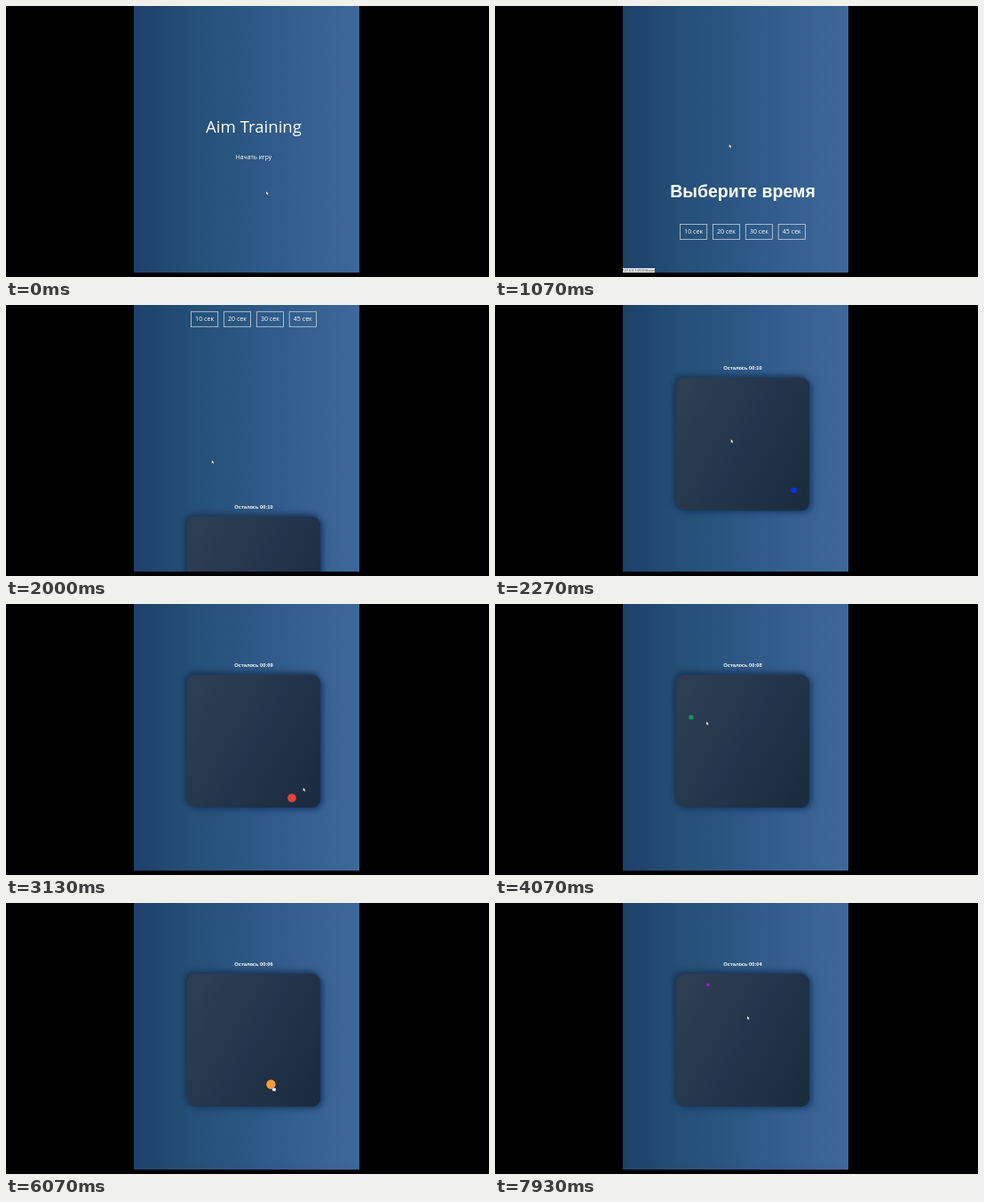
An HTML page for the animation above (8000 ms loop, 544 by 306 pixels).

```html
<!DOCTYPE html>
<html lang="ru">
<head>
<meta charset="utf-8">
<title>Aim Training</title>
<style>
  html, body { margin: 0; width: 100%; height: 100%; overflow: hidden; background: #000; }
  svg { display: block; width: 544px; height: 306px; }
  text { fill: #fff; text-anchor: middle; font-family: "Open Sans", "Noto Sans", sans-serif; }
  .bold { font-family: "Liberation Sans", Arial, sans-serif; font-weight: bold; }
  .glow { filter: blur(3px); }
</style>
</head>
<body>
<svg viewBox="0 0 544 306">
  <defs>
    <linearGradient id="sky">
      <stop offset="0" stop-color="#1d406b"/>
      <stop offset=".25" stop-color="#244f76"/>
      <stop offset=".6" stop-color="#2f5a89"/>
      <stop offset="1" stop-color="#3e6899"/>
    </linearGradient>
    <linearGradient id="slate" x1="0" y1=".22" x2="1" y2=".78">
      <stop offset="0" stop-color="#2e3e53"/>
      <stop offset=".5" stop-color="#23354c"/>
      <stop offset="1" stop-color="#1c2c40"/>
    </linearGradient>
    <clipPath id="view"><rect x="144" width="254" height="301"/></clipPath>
  </defs>

  <g clip-path="url(#view)">
    <rect x="144" width="254" height="301" fill="url(#sky)"/>
    <g id="pages">
      <text x="279" y="143" font-size="18.6">Aim Training</text>
      <text x="279" y="172.5" font-size="6.8">Начать игру</text>

      <g transform="translate(0 301)">
        <text class="bold" x="279" y="119.5" font-size="19.5">Выберите время</text>
        <g id="buttons"></g>
      </g>

      <g transform="translate(0 602)">
        <text class="bold" id="timer" x="279" y="71" font-size="5.7"></text>
        <rect class="glow" x="201.6" y="77.6" width="150" height="150" rx="9" fill="#1a3252"/>
        <rect class="glow" x="207" y="82" width="150" height="150" rx="9" fill="#173d6e"/>
        <rect x="204" y="80" width="150" height="150" rx="9" fill="url(#slate)"/>
        <circle id="target"/>
      </g>
    </g>

    <g id="status">
      <rect x="144" y="296" width="36" height="5" fill="#e6e8ea"/>
      <text x="162" y="299.9" font-size="3.7" style="fill:#333">127.0.0.1:5500/#start</text>
    </g>

    <path id="arrow" d="M0 0V4.2L1 3.3 1.7 4.7 2.4 4.3 1.8 3H3Z"
          fill="#fff" stroke="#223" stroke-width=".3"/>
    <path id="hand" d="M-.6 .6Q0-.5 .6 .6V2.2L3 2.8V4.6L2.3 6H-.2L-1.8 3.6-1.2 3-.6 3.5Z"
          fill="#fff" stroke="#223" stroke-width=".3"/>
  </g>
</svg>

<script>
const LOOP = 8000, PAGE = 301, GAME_START = 1860;
const $ = id => document.getElementById(id);

// time, x, y of the pointer tip
const pointer = [
  [0, 293, 209], [560, 280, 169], [800, 280, 169], [1070, 263.7, 156],
  [1550, 226, 159], [1840, 225, 161], [2000, 231.7, 175], [2270, 265.7, 151.5],
  [2900, 336, 206], [3080, 335, 207], [3600, 322, 218], [3720, 322, 218],
  [4070, 238, 132.5], [4400, 221, 128], [4560, 221, 128], [5350, 239, 195],
  [5500, 240, 195], [6070, 301, 206.5], [6160, 301, 206], [6700, 343, 164],
  [6820, 343, 164], [7300, 290, 198], [7420, 290, 198], [7930, 284, 127.5],
  [8000, 279, 123]
];

// appearance time, x, y, radius, colour
const targets = [
  [0, 336.5, 207, 3.2, '#0a2cf2'],
  [3060, 322, 219, 4.8, '#e0443c'],
  [3720, 221, 128, 2.7, '#0f9150'],
  [4560, 238.5, 195.5, 4.4, '#2f8fe0'],
  [5500, 298.4, 204.8, 5.2, '#ff9a35'],
  [6160, 343, 165, 5, '#1fa89a'],
  [6820, 290, 199, 4.8, '#d23c78'],
  [7420, 240, 92.5, 1.9, '#8d1fd0']
];

$('buttons').innerHTML = [10, 20, 30, 45].map((sec, i) => {
  const x = 208.5 + i * 36.9;
  return `<rect x="${x}" y="149.7" width="30.2" height="17" fill="none"
            stroke="#c3d0df" stroke-width=".8"/>
          <text x="${x + 15.1}" y="160.3" font-size="7.1">${sec} сек</text>`;
}).join('');

// cubic-bezier(0, 0, .58, 1), solved by bisection
function easeOut(p) {
  if (p <= 0) return 0;
  if (p >= 1) return 1;
  let low = 0, high = 1, s;
  for (let i = 0; i < 24; i++) {
    s = (low + high) / 2;
    if (1.74 * (1 - s) * s * s + s ** 3 < p) low = s; else high = s;
  }
  return 3 * s * s - 2 * s ** 3;
}

const slide = (t, start, length) => PAGE * easeOut((t - start) / length);
const show = (id, on) => $(id).setAttribute('visibility', on ? 'visible' : 'hidden');

function pointerAt(t) {
  const i = pointer.findIndex(key => key[0] > t);
  const [t0, x0, y0] = pointer[i - 1], [t1, x1, y1] = pointer[i];
  const p = (t - t0) / (t1 - t0), k = p * p * (3 - 2 * p);
  return [x0 + (x1 - x0) * k, y0 + (y1 - y0) * k];
}

function draw() {
  const t = performance.now() % LOOP;
  const scroll = slide(t, 779, 591) + slide(t, GAME_START, 440);
  $('pages').setAttribute('transform', `translate(0 ${-scroll})`);

  const left = 10 - Math.max(0, Math.floor((t - GAME_START) / 1000));
  $('timer').textContent = 'Осталось 00:' + String(left).padStart(2, '0');

  const [, cx, cy, r, fill] = targets.findLast(target => target[0] <= t);
  for (const [name, value] of Object.entries({ cx, cy, r, fill }))
    $('target').setAttribute(name, value);

  const [x, y] = pointerAt(t);
  const onTarget = t > 2300 && Math.hypot(x - cx, y - cy) <= r;
  const onLink = t > 500 && t < 860;
  for (const id of ['arrow', 'hand']) {
    $(id).setAttribute('transform', `translate(${x} ${y})`);
    show(id, (id === 'hand') === (onTarget || onLink));
  }
  show('status', t > 500 && t < 1350);
  requestAnimationFrame(draw);
}
draw();
</script>
</body>
</html>
```
